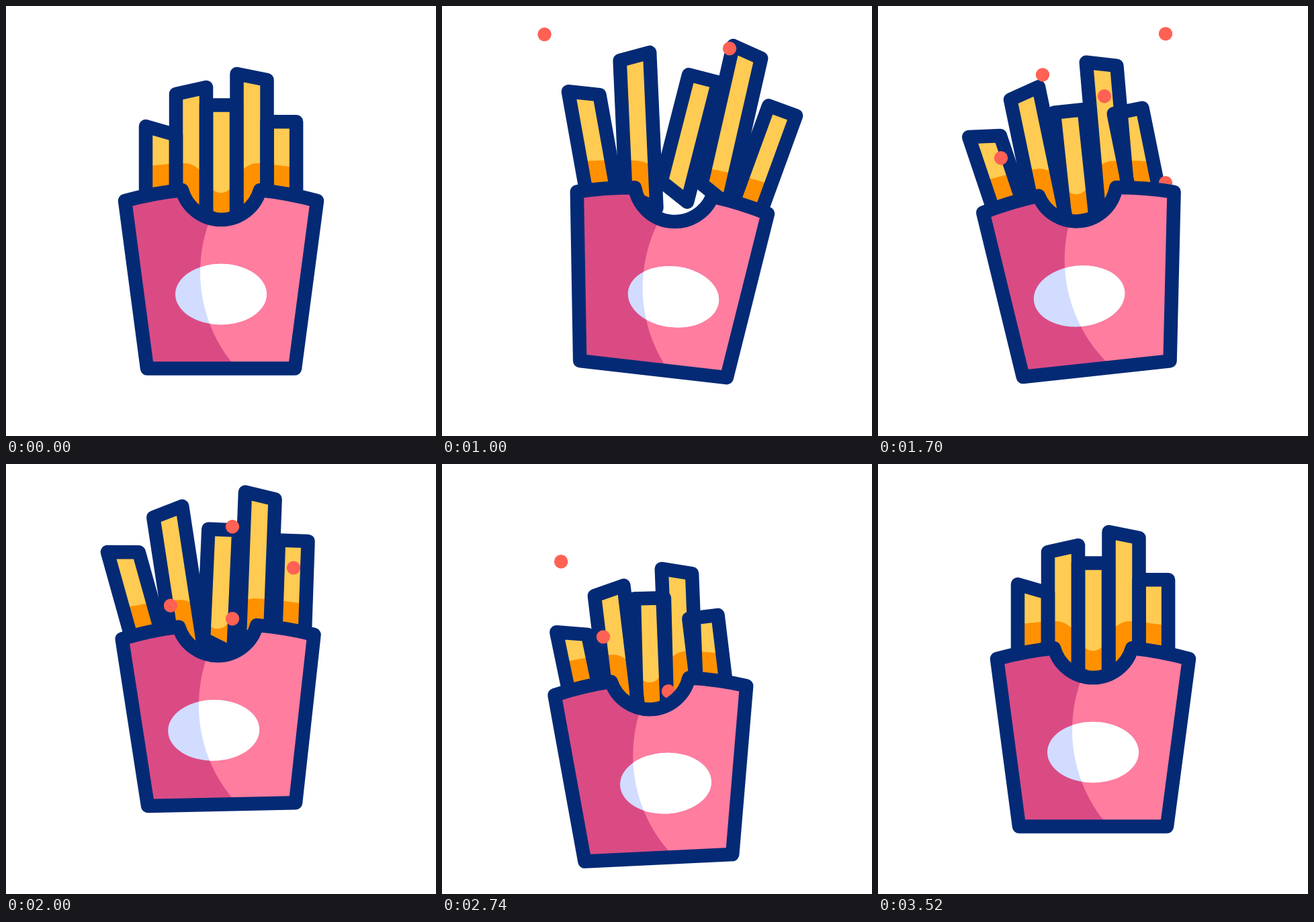
An HTML page with a canvas that plays this animation: 640 by 640 pixels, repeating every 3600 ms.

```html
<!DOCTYPE html>
<html lang="en">
<head>
<meta charset="utf-8">
<title>Salted fries</title>
<style>
  html, body { margin: 0; width: 100%; height: 100%; overflow: hidden; background: #fff; }
  canvas { display: block; width: 100vw; height: 100vh; }
</style>
</head>
<body>
<canvas id="stage" width="640" height="640"></canvas>
<script>
const LOOP = 3600;
const NAVY = '#042a75', YELLOW = '#ffcb52', ORANGE = '#ff9100', PINK = '#ff7d9f',
      PLUM = '#da4b84', ICE = '#d1dcff', RED = '#ff6154';
const ctx = document.getElementById('stage').getContext('2d');

// Smooth curve through the keys; flat at turning points and outside the range.
function track(times, values) {
  const last = times.length - 1;
  const slope = i => (values[i + 1] - values[i]) / (times[i + 1] - times[i]);
  const tangent = times.map((_, i) => {
    if (i === 0 || i === last) return 0;
    const a = slope(i - 1), b = slope(i);
    return a * b > 0 ? 2 * a * b / (a + b) : 0;
  });
  return t => {
    if (t <= times[0]) return values[0];
    if (t >= times[last]) return values[last];
    let i = 0;
    while (t > times[i + 1]) i++;
    const w = times[i + 1] - times[i], p = (t - times[i]) / w, q = 1 - p;
    return values[i] * (1 + 2 * p) * q * q + values[i + 1] * p * p * (3 - 2 * p)
      + w * p * q * (tangent[i] * q - tangent[i + 1] * p);
  };
}

// Straight segments, continuing past the last key.
function fall(keys, t) {
  let i = 0;
  while (i < keys.length - 2 && t > keys[i + 1][0]) i++;
  const [t0, y0] = keys[i], [t1, y1] = keys[i + 1];
  return y0 + (y1 - y0) * (t - t0) / (t1 - t0);
}

const tilt = track(
  [200, 680, 1000, 1080, 1700, 1790, 2270, 2320, 2740, 2980, 3500],
  [0, 3.64, 6.54, 7, -6.15, -7, 7, 6.82, -2.74, -7, 0]);
const lift = track(
  [200, 680, 720, 1000, 1260, 1400, 1700, 1990, 2320, 2700, 2740, 2880, 3500],
  [0, -31.4, -33, 1.3, 38, 51, 1.1, -33, 7.8, 48, 46.9, 37, 0]);
const slide = track(
  [200, 680, 1000, 1440, 1700, 1850, 2320, 2500, 2740, 3020, 3500],
  [0, 16.4, 17.5, 15, -13.8, -16, 14.2, 17, 16, -10, 0]);

// Fry poses inside the box: [dx, dy, degrees] for rise, lean, sink, sway, second lean.
const POSE_TIMES = [200, 680, 1000, 1440, 1700, 2320, 2740, 3480];
function fry(x, y, half, skew, left, right, rise, lean, sink, sway, lean2) {
  const rest = [0, 0, 0];
  const poses = [rest, rise, lean, sink, sway, lean2, sink, rest];
  return {
    x, y,
    pose: rest.map((_, k) => track(POSE_TIMES, poses.map(p => p[k]))),
    shape: new Path2D(`M${-half} ${-skew}L${half} ${skew}V${right}L${-half} ${left}Z`)
  };
}
const fries = [
  fry(230.5, 185.5, 22.5, 6.5, 160, 160,
    [-60, -48, -15.6], [-60, -42.5, -16.7], [-23, 14, -9], [-39, -8, -12.4], [-54, -33.5, -15.3]),
  fry(275.5, 126, 22.5, -5, 205, 227,
    [-28.6, -75.7, -7], [-36, -46, -9.1], [-10, 12.6, -4.1], [-18, -6, -5.6], [-31, -33.6, -8.5]),
  fry(320.5, 147.5, 22.5, 0, 164, 184,
    [7.6, -24, 2.8], [24, -46.5, 7.8], [4.2, 5.4, 1.3], [0, 6, 0.1], [23.5, -41.6, 7.8]),
  fry(366, 105.5, 22.5, 4.5, 206.5, 228.5,
    [24, -40, 3.6], [39, -51, 6.3], [1.6, 9, 0.5], [10, -16.4, 1.2], [28.5, -27.5, 5.2]),
  fry(410.3, 172.3, 21.8, 0, 160, 160,
    [40.4, -42.6, 8], [56.7, -37, 13.5], [-6.5, 12, -4.1], [-2.5, -9.6, -5.3], [50.7, -29.5, 12.5])
];

const box = new Path2D('M177 290Q219 278.5 262 274A60.2 60.2 0 0 0 378 274Q421 278.5 463 290L430 539.5H210Z');
const shade = new Path2D('M150 250Q225 234 266 234C300 236 296 278 320 278C344 278 340 236 374 234Q415 236 490 252V350H150Z');
const light = new Path2D();
light.arc(506, 396, 217, 0, 7);

const drift = y => 183 - 42 * Math.max(0, 1 - y / 180) ** 1.2;
const grains = [
  { x: drift, end: 305, keys: [[1000, 42], [1700, 226]] },
  { x: drift, end: 305, keys: [[2320, 36], [2740, 145]] },
  { x: () => 245, end: 400, keys: [[1390, -10], [1700, 102]] },
  { x: () => 240, end: 400, keys: [[2320, 104], [2740, 257]] },
  { x: () => 337, end: 400, keys: [[1250, -10], [1700, 134]] },
  { x: () => 337, end: 400, keys: [[1701, -11], [2320, 204], [2740, 338]] },
  { x: () => 428, end: 400, keys: [[715, -10], [1000, 63], [1700, 263]] },
  { x: () => 428, end: 400, keys: [[1700, 41], [2320, 275]] }
];

function turn(deg) { ctx.rotate(deg * Math.PI / 180); }

function scoped(draw) {
  ctx.save();
  draw();
  ctx.restore();
}

function fill(path, color) {
  ctx.fillStyle = color;
  ctx.fill(path);
}

function enterBox(t) {
  ctx.translate(320, 491 + lift(t));
  turn(tilt(t));
  ctx.translate(-320, -491);
}

function enterFry(f, t) {
  const [dx, dy, angle] = f.pose.map(p => p(t));
  ctx.translate(f.x + dx, f.y + dy);
  turn(angle);
}

function drawFries(t) {
  for (const f of fries) scoped(() => {
    const frame = ctx.getTransform();
    enterFry(f, t);
    fill(f.shape, YELLOW);
    ctx.clip(f.shape);
    ctx.setTransform(frame);
    fill(shade, ORANGE);
  });
  for (const f of fries) scoped(() => {
    enterFry(f, t);
    ctx.stroke(f.shape);
  });
}

function drawGrains(t) {
  ctx.fillStyle = RED;
  for (const g of grains) {
    const y = fall(g.keys, t);
    if (y < -12 || y > g.end) continue;
    ctx.beginPath();
    ctx.arc(g.x(y), y, 10.2, 0, 7);
    ctx.fill();
  }
}

function drawBox(t) {
  const label = new Path2D();
  label.ellipse(320 + slide(t), 429, 68, 45.3, 0, 0, 7);
  scoped(() => {
    ctx.clip(box);
    fill(box, PLUM);
    fill(light, PINK);
    fill(label, ICE);
    ctx.clip(light);
    fill(label, '#fff');
  });
  ctx.stroke(box);
}

function draw(t) {
  ctx.fillStyle = '#fff';
  ctx.fillRect(0, 0, 640, 640);
  ctx.strokeStyle = NAVY;
  ctx.lineWidth = 20.5;
  ctx.lineJoin = 'round';
  scoped(() => { enterBox(t); drawFries(t); });
  drawGrains(t);
  scoped(() => { enterBox(t); drawBox(t); });
}

const start = performance.now();
function tick() {
  draw((performance.now() - start) % LOOP);
  requestAnimationFrame(tick);
}
tick();
</script>
</body>
</html>
```
